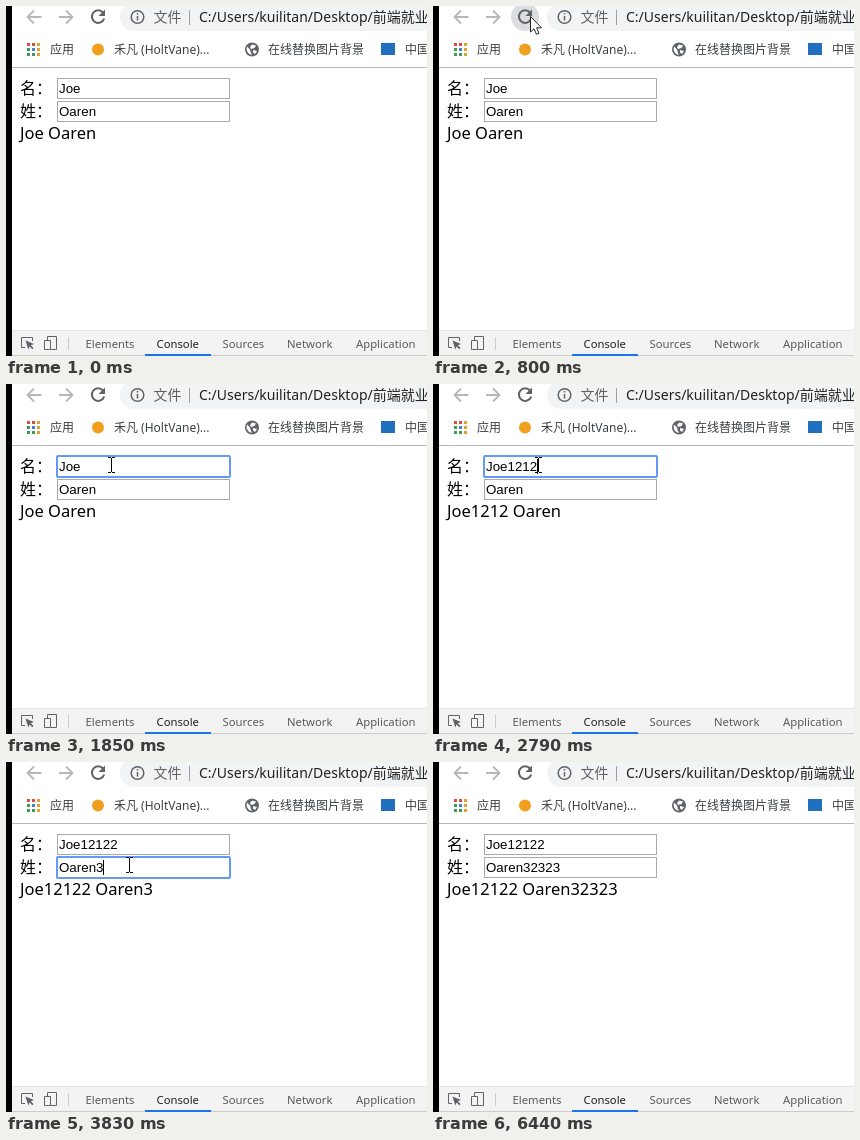
Write an HTML page that moves like this. It is 421 by 350 pixels and loops after 6490 ms.

```html
<!DOCTYPE html>
<html lang="zh-CN">
<head>
<meta charset="utf-8">
<title>Full name form</title>
<style>
  html, body { margin: 0; width: 100%; height: 100%; overflow: hidden; background: #fff; }
  svg { display: block; font-family: "Noto Sans", "Noto Sans CJK SC", "Noto Sans CJK", sans-serif; }
  .url { font-size: 14px; fill: #202124; }
  .muted { fill: #5f6368; }
  .bookmarks { font-size: 12px; fill: #3c4043; }
  .label { font-size: 16px; }
  .output { font-size: 16.5px; }
  .field text { font: 13.333px "Liberation Sans", Arial, sans-serif; }
  .tabs { font-size: 11.3px; fill: #5a5a5a; }
  .line { fill: none; stroke: #5f6368; }
</style>
</head>
<body>
<svg width="421" height="350" viewBox="0 0 421 350">
  <rect width="421" height="350" fill="#fff"/>

  <!-- toolbar -->
  <g fill="none" stroke="#b5b7ba" stroke-width="1.8">
    <path d="M35.5 11H22M28 4.5L21.5 11L28 17.5"/>
    <path d="M53 11H66.5M60 4.5L66.5 11L60 17.5"/>
  </g>
  <circle id="hover" cx="92" cy="11" r="14" fill="#dcdde0"/>
  <path class="line" stroke-width="2" d="M97 6.5A6.3 6.3 0 1 0 98.2 12.5"/>
  <path class="muted" d="M99 3.5V10H92.5Z"/>
  <rect x="114" y="-3" width="340" height="28" rx="14" fill="#f1f3f4"/>
  <circle class="line" cx="131.5" cy="11" r="6.3" stroke-width="1.5"/>
  <path class="line" stroke-width="1.5" d="M131.5 10V14.5M131.5 7V8.5"/>
  <g class="url">
    <text class="muted" x="147.5" y="16">文件</text>
    <rect x="183" y="4" width="1" height="15" fill="#9aa0a6"/>
    <text x="193" y="16">C:/Users/kuilitan/Desktop/前端就业</text>
  </g>

  <!-- bookmarks -->
  <g id="apps"></g>
  <circle cx="92" cy="43.5" r="6" fill="#f0a01e"/>
  <circle class="muted" cx="246" cy="43.5" r="7"/>
  <path fill="#fff" d="M241 40.5L244 43.5L245 47L246 49Q241 48 240.5 43ZM246 38.5L250 39.5L248.5 42L245 43L244 41ZM247 44L251 45L249 48L247 46.5Z"/>
  <rect x="375" y="37" width="14" height="12" fill="#2070bd"/>
  <g class="bookmarks">
    <text x="44" y="48">应用</text>
    <text x="108" y="48">禾凡 (HoltVane)...</text>
    <text x="262" y="48">在线替换图片背景</text>
    <text x="399" y="48">中国</text>
  </g>
  <rect y="61" width="421" height="1" fill="#b9b9b9"/>

  <!-- page -->
  <g id="page">
    <text class="label" x="14" y="88">名：</text>
    <text class="label" x="14" y="111">姓：</text>
    <g class="field" transform="translate(51 72)"></g>
    <g class="field" transform="translate(51 95)"></g>
    <text class="output" id="output" x="14" y="133"></text>
  </g>

  <!-- developer tools -->
  <rect y="324" width="421" height="26" fill="#f3f3f3"/>
  <path stroke="#e6e6e6" d="M0 324.5H421"/>
  <path stroke="#cbcbcb" d="M0 349.5H421M62.5 331V344"/>
  <path class="line" d="M19 341.5H15.5V331.5H26.5V335"/>
  <path class="muted" d="M19.5 334.5L28 338L24.8 339.3L27.5 342L26.3 343.2L23.6 340.5L22.3 343.5Z"/>
  <path class="line" d="M41.5 334V330.5H50.5V343.5H45M38.5 334.5H44.5V343.5H38.5Z"/>
  <g class="tabs">
    <text x="79.5" y="342">Elements</text>
    <text x="150.5" y="342" fill="#222">Console</text>
    <text x="216.5" y="342">Sources</text>
    <text x="281" y="342">Network</text>
    <text x="350" y="342">Application</text>
  </g>
  <rect x="139" y="348" width="66" height="2" fill="#1a73e8"/>

  <rect width="6" height="350" fill="#000"/>
  <g id="cursor">
    <path id="arrow" fill="#fff" stroke="#222" d="M.5 .5V16L4 12.8L6.5 18.3L9 17.2L6.6 11.8H11.5Z"/>
    <path id="beam" fill="none" stroke="#000" d="M-3 -7.5H0M1 -7.5H4M.5 -7V7M-3 7.5H0M1 7.5H4"/>
  </g>
</svg>
<script>
const LOOP = 6490;
const $ = id => document.getElementById(id);
const show = (el, on) => el.setAttribute('visibility', on ? 'inherit' : 'hidden');

// Steps: [start ms, value], each held until the next one.
const at = (steps, t) => steps.reduce((value, s) => s[0] <= t ? s[1] : value, null);

const firstName = [[0, 'Joe'], [2280, 'Joe1'], [2480, 'Joe12'], [2660, 'Joe121'], [2790, 'Joe1212'], [2980, 'Joe12122']];
const lastName = [[0, 'Oaren'], [3830, 'Oaren3'], [3970, 'Oaren32'], [4130, 'Oaren323'], [4400, 'Oaren3232'], [4520, 'Oaren32323']];
const focus = [[0, -1], [1360, 0], [3340, 1], [6440, -1]];
const caretOn = [[0, false], [1360, true], [1850, false], [2280, true], [5020, false], [5570, true], [6060, false]];
const hover = [[0, false], [550, true], [985, false]];
const loaded = [[0, true], [860, false], [920, true]];

const pointer = [
  [0, null],
  [60, ['arrow', 316, 336]], [120, ['arrow', 290, 290]], [180, ['arrow', 248, 232]],
  [245, ['arrow', 200, 172]], [305, ['arrow', 152, 118]], [365, ['arrow', 112, 70]],
  [425, ['arrow', 84, 38]], [490, ['arrow', 76, 20]], [550, ['arrow', 88, 12]],
  [610, ['arrow', 96, 9]], [730, ['arrow', 97, 10]],
  [985, ['arrow', 98, 15]], [1050, ['arrow', 100, 32]], [1110, ['arrow', 103, 54]],
  [1170, ['beam', 105, 74]], [1230, ['beam', 104, 79]], [1300, ['beam', 103, 80]],
  [1420, ['beam', 105, 81]],
  [3040, ['beam', 108, 84]], [3100, ['beam', 115, 94]], [3160, ['beam', 122, 102]],
  [3410, ['beam', 123, 103]],
  [4600, ['beam', 136, 126]], [4660, ['arrow', 168, 162]], [4740, ['arrow', 216, 222]],
  [4820, null]
];

const appColors = ['#d9503f', '#d9503f', '#e2a02c', '#3f9a57', '#4a7fd0', '#e2a02c', '#3f9a57', '#3f9a57', '#e2a02c'];
$('apps').innerHTML = appColors.map((color, i) =>
  `<rect x="${21 + i % 3 * 5}" y="${37 + Math.floor(i / 3) * 5}" width="3" height="3" fill="${color}"/>`).join('');

const fields = [...document.querySelectorAll('.field')].map(el => {
  el.innerHTML = `
    <rect x=".5" y=".5" width="172" height="20" fill="#fff" stroke="#a9a9a9"/>
    <rect width="173" height="21" rx="1" fill="none" stroke="#6499f6" stroke-width="2"/>
    <text x="2" y="15"></text>
    <rect y="3" width="1" height="15"/>`;
  const [, ring, text, caret] = el.children;
  return { ring, text, caret };
});

function drawField({ ring, text, caret }, value, focused, blink) {
  if (text.textContent !== value) text.textContent = value;
  show(ring, focused);
  show(caret, focused && blink);
  caret.setAttribute('x', Math.round(2 + text.getComputedTextLength()));
}

function draw(t) {
  const names = [at(firstName, t), at(lastName, t)];
  const active = at(focus, t);
  fields.forEach((field, i) => drawField(field, names[i], active === i, at(caretOn, t)));
  $('output').textContent = names.join(' ');
  show($('page'), at(loaded, t));
  show($('hover'), at(hover, t));

  const cursor = at(pointer, t);
  show($('cursor'), cursor);
  if (cursor) {
    const [shape, x, y] = cursor;
    $('cursor').setAttribute('transform', `translate(${x} ${y})`);
    show($('arrow'), shape === 'arrow');
    show($('beam'), shape === 'beam');
  }
}

const start = performance.now();
function tick() {
  draw((performance.now() - start) % LOOP);
  requestAnimationFrame(tick);
}
tick();
</script>
</body>
</html>
```
